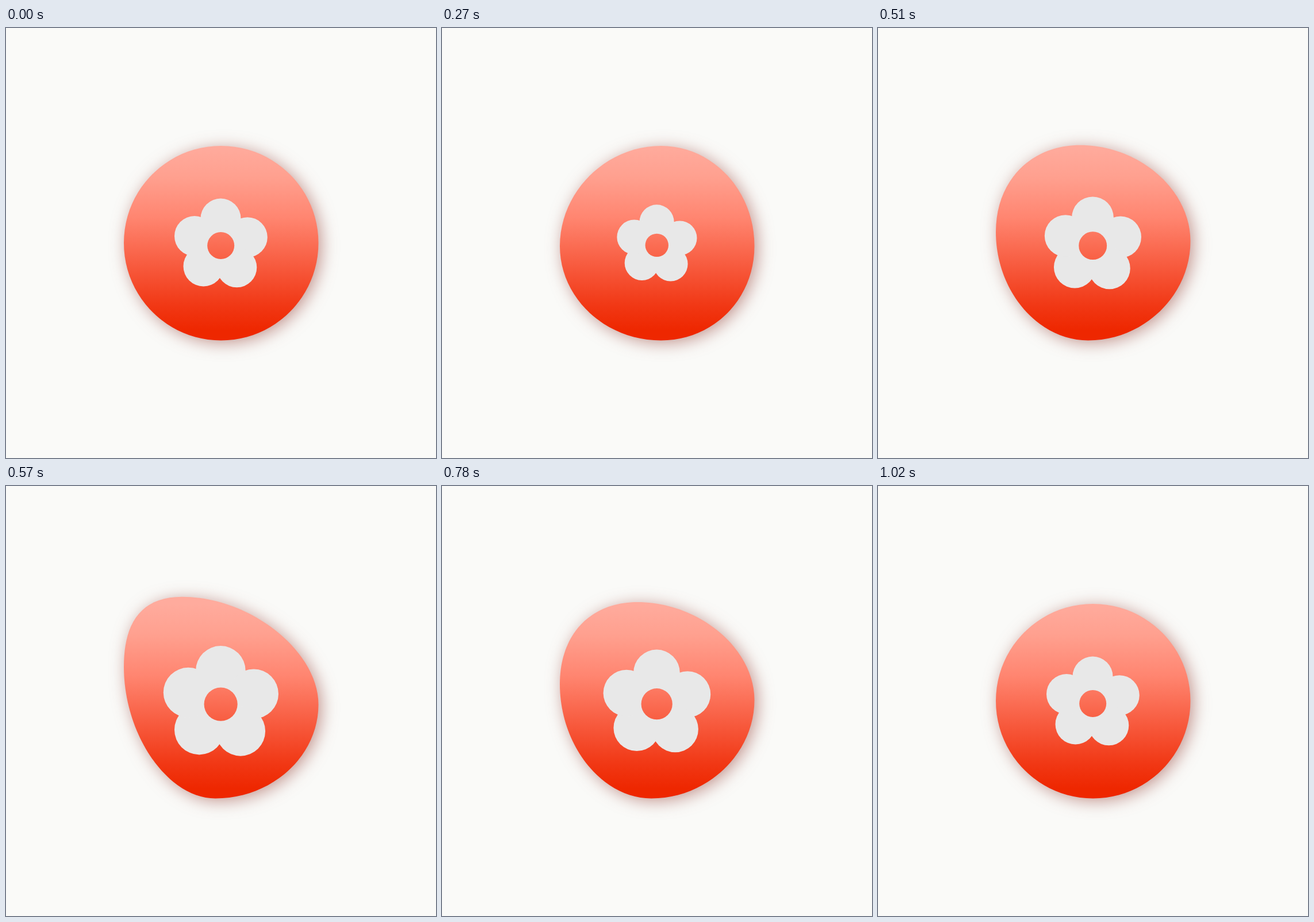
Animation of 748x748 px, one loop 1.08 s. Source, as an HTML page:

```html
<!DOCTYPE html>
<html lang="en">
<head>
<meta charset="utf-8">
<title>Blob and flower</title>
<style>
  html, body { margin: 0; width: 100%; height: 100%; overflow: hidden; background: #fafaf8; }
  svg { display: block; width: 100%; height: 100%; }
</style>
</head>
<body>
<svg viewBox="0 0 748 748">
  <defs>
    <linearGradient id="heat" gradientUnits="userSpaceOnUse" x1="0" y1="205" x2="0" y2="543">
      <stop offset="0" stop-color="#ffab9d"/>
      <stop offset=".16" stop-color="#ffa08f"/>
      <stop offset=".37" stop-color="#ff8570"/>
      <stop offset=".82" stop-color="#f13815"/>
      <stop offset=".95" stop-color="#ee2700"/>
    </linearGradient>
    <filter id="shadow" filterUnits="userSpaceOnUse" x="120" y="120" width="510" height="510" color-interpolation-filters="sRGB">
      <feDropShadow dx="5" dy="4.5" stdDeviation="14" flood-color="#8c3228" flood-opacity=".5"/>
    </filter>
    <mask id="ring" maskUnits="userSpaceOnUse" x="-100" y="-100" width="200" height="200">
      <rect x="-100" y="-100" width="200" height="200" fill="#fff"/>
      <circle cx="-.3" cy="4.5" r="23.5"/>
    </mask>
  </defs>
  <path id="blob" fill="url(#heat)" filter="url(#shadow)"/>
  <g id="flower">
    <g fill="#e8e8e8" mask="url(#ring)">
      <circle cx="-.5" cy="-42.5" r="35"/>
      <circle cx="46" cy="-10" r="34.8"/>
      <circle cx="27.5" cy="42.5" r="34.8"/>
      <circle cx="-30.5" cy="40.5" r="35"/>
      <circle cx="-46" cy="-12" r="35"/>
    </g>
  </g>
</svg>
<script>
const LOOP = 1080, STEP = 30, MID = 374, R = 169;
const times = [150, 407, 583, 1020]; // rest, squeeze, swell, rest

const blob = document.getElementById('blob');
const flower = document.getElementById('flower');

function sample(values, time) {
  const t = Math.min(Math.max(time, times[0]), times[3]);
  const i = Math.max(1, times.findIndex(end => end >= t));
  const u = (t - times[i - 1]) / (times[i] - times[i - 1]);
  return values[i - 1] + (values[i] - values[i - 1]) * u;
}

// Quarter curve through a corner; short sides bulge more than long ones.
function quarter([x0, y0], [cx, cy], [x1, y1]) {
  const size = Math.abs(x1 - x0) + Math.abs(y1 - y0);
  const k = .5523 * (2 * R / size) ** .45;
  return `C${x0 + (cx - x0) * k} ${y0 + (cy - y0) * k} ${x1 + (cx - x1) * k} ${y1 + (cy - y1) * k} ${x1} ${y1}`;
}

// The four extreme points slide along their sides as the blob leans.
function blobPath(lean) {
  const slide = (a, b) => MID + a * lean + b * lean * lean;
  const lift = 17 * (lean * (1 + lean) / 2) ** 2;
  const low = MID - R, high = MID + R + .5, peak = low - lift;
  const top = [slide(-42, -38), peak];
  const right = [high, slide(-19, 29)];
  const bottom = [slide(-29, 20), high];
  const left = [low, slide(-33, -38)];
  return `M${top}` +
    quarter(top, [high, peak], right) +
    quarter(right, [high, high], bottom) +
    quarter(bottom, [low, high], left) +
    quarter(left, [low, peak], top) + 'Z';
}

function draw(time) {
  const t = Math.floor(time % LOOP / STEP) * STEP;
  const scale = sample([1, .7, 1.28, 1], t);
  blob.setAttribute('d', blobPath(sample([0, -.446, 1, 0], t)));
  flower.setAttribute('transform', `translate(${MID} ${MID}) scale(${scale})`);
}

const begin = performance.now();
function tick() {
  draw(performance.now() - begin);
  requestAnimationFrame(tick);
}
tick();
</script>
</body>
</html>
```
